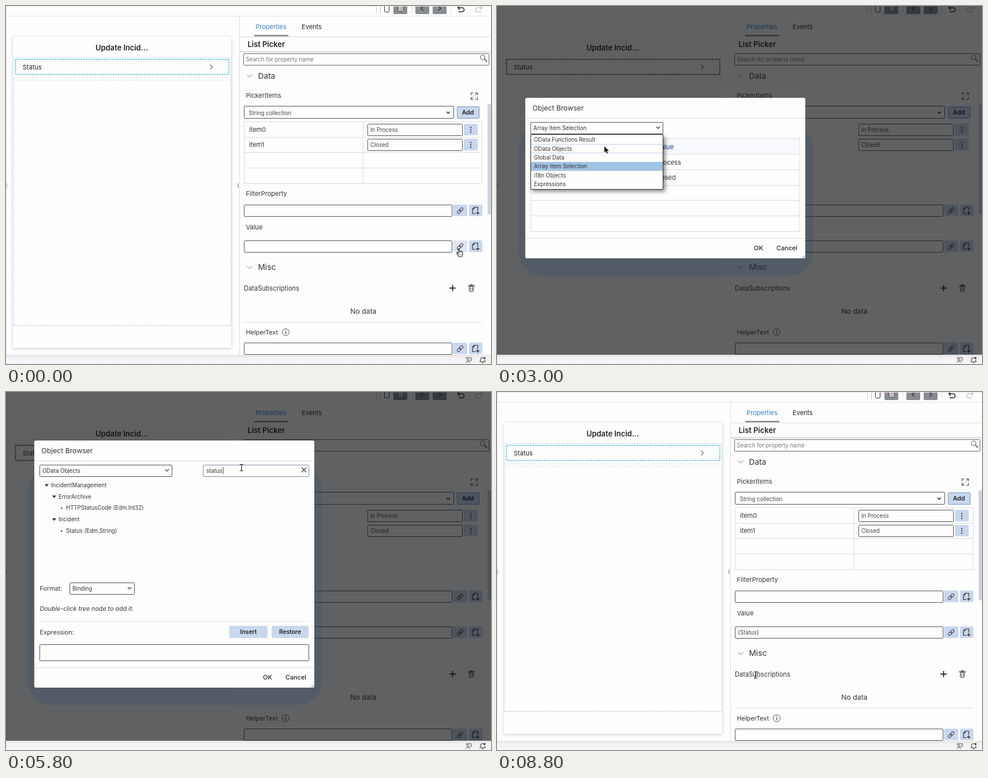
These frames come from a looping animation (840 px wide and 620 px high, 9.2 s). An HTML page with a canvas:

```html
<!DOCTYPE html>
<html lang="en">
<head>
<meta charset="utf-8">
<title>Binding a list picker value</title>
<style>
html, body { margin: 0; width: 100%; height: 100%; overflow: hidden; background: #fefefe; }
canvas { display: block; width: 840px; height: 620px; }
</style>
</head>
<body>
<canvas id="stage" width="840" height="620"></canvas>
<script>
const stage = document.getElementById('stage');
const layer = Object.assign(document.createElement('canvas'), { width: 840, height: 620 });
const page = stage.getContext('2d'), sheet = layer.getContext('2d');
let ctx = page; // where the helpers draw

const LOOP = 9200, TICK = 200;
const SMALL = 9.65, BASE = 11;
const INK = '#232325', BORDER = '#555557', PALE = '#dcdde0', BUTTON = '#c9d7ee';

// Stepped values: the last entry whose time has passed
const VEIL = [[0, 0], [200, 0.5], [400, 1], [8600, 0.4], [8800, 0]];
const DIALOG = [[0, 0], [200, 0.5], [400, 1], [8400, 0.25], [8600, 0]];
const QUERY = [[0, ''], [4800, 's'], [5000, 'sta'], [5200, 'statu'], [5400, 'status']];
const POINTER = [[0, 'hand'], [600, 'arrow'], [1200, 'hand'], [1800, 'arrow'], [4200, 'beam'],
  [4800, 'none'], [5800, 'beam'], [6000, 'arrow'], [8000, 'hand'], [8600, 'beam']];
// Pointer path: time, x, y
const PATH = [[0, 786, 427], [400, 786, 427], [1200, 285, 224], [1800, 285, 224], [2200, 268, 235],
  [2600, 268, 235], [3000, 186, 243], [3600, 186, 243], [4400, 408, 131], [5800, 408, 131],
  [6400, 150, 235], [7200, 150, 235], [8000, 450, 497], [8400, 450, 497], [8600, 448, 490]];

const SOURCES = ['OData Functions Result', 'OData Objects', 'Global Data',
  'Array Item Selection', 'i18n Objects', 'Expressions'];
const TREE = [[0, 'open', 'IncidentManagement'], [1, 'shut', 'ErrorArchive'], [1, 'shut', 'EventLog'],
  [1, 'open', 'Incident'], [2, 'open', 'customer (IncidentManagementMobileService.Customer)'],
  [3, 'leaf', 'AddressCity (Edm.String)'], [3, 'leaf', 'AddressCountry (Edm.String)'],
  [3, 'leaf', 'AddressHouseNumber (Edm.String)'], [3, 'leaf', 'AddressPostCode (Edm.String)']];
const MATCHES = [[0, 'open', 'IncidentManagement'], [1, 'open', 'ErrorArchive'],
  [2, 'leaf', 'HTTPStatusCode (Edm.Int32)'], [1, 'open', 'Incident'], [2, 'leaf', 'Status (Edm.String)']];

const HAND = new Path2D('M3.2 6V1.6c0-1.6 2-1.6 2 0V5c.3-1 1.9-.8 1.9.3.5-.9 1.9-.6 1.9.5.6-.6 1.8-.3 1.8.9V9.5L9.6 14H4.2L.8 8.8C0 7.4 1.4 6.6 2.3 7.6L3.2 8.6Z');
const ARROW = new Path2D('M0 0V11L2.5 8.6 4.2 12.6 6 11.8 4.3 8H7.8Z');

function stepAt(list, t) {
  let value = list[0][1];
  for (const [time, v] of list) if (t >= time) value = v;
  return value;
}

function pointerAt(t) {
  for (let i = 1; i < PATH.length; i++) {
    const [t0, x0, y0] = PATH[i - 1], [t1, x1, y1] = PATH[i];
    if (t < t1) {
      const u = (t - t0) / (t1 - t0), e = u * u * (3 - 2 * u);
      return [x0 + (x1 - x0) * e, y0 + (y1 - y0) * e];
    }
  }
  return PATH[PATH.length - 1].slice(1);
}

function fill(x, y, w, h, color, r = 0) {
  ctx.fillStyle = color;
  ctx.beginPath();
  ctx.roundRect(x, y, w, h, r);
  ctx.fill();
}

// Framed box given by its outer edges
function box(x0, y0, x1, y1, stroke = BORDER, back = null, r = 1) {
  if (back) fill(x0, y0, x1 - x0, y1 - y0, back, r);
  ctx.strokeStyle = stroke;
  ctx.lineWidth = 1;
  ctx.beginPath();
  ctx.roundRect(x0 + 0.5, y0 + 0.5, x1 - x0 - 1, y1 - y0 - 1, r);
  ctx.stroke();
}

function poly(points, color = INK, width = 1, closed = false) {
  ctx.beginPath();
  points.forEach(([x, y], i) => i ? ctx.lineTo(x, y) : ctx.moveTo(x, y));
  if (closed) {
    ctx.closePath();
    ctx.fillStyle = color;
    ctx.fill();
  } else {
    ctx.strokeStyle = color;
    ctx.lineWidth = width;
    ctx.stroke();
  }
}

const rule = (x0, x1, y, color = PALE) => fill(x0, y, x1 - x0, 1, color);
const post = (x, y0, y1, color = PALE) => fill(x, y0, 1, y1 - y0, color);

// y is the middle of the capitals
function text(s, x, y, size = BASE, color = INK, style = '400', align = 'left') {
  ctx.font = `${style} ${size}px Inter, Roboto, sans-serif`;
  ctx.textAlign = align;
  ctx.fillStyle = color;
  ctx.fillText(s, x, y + size * 0.36);
}

function chevron(x, y, color = INK, w = 3, width = 1.4) {
  poly([[x - w, y - w / 2], [x, y + w / 2], [x + w, y - w / 2]], color, width);
}

function dashed(x0, y0, x1, y1, color, width, pattern) {
  ctx.setLineDash(pattern);
  poly([[x0, y0], [x1, y0], [x1, y1], [x0, y1], [x0, y0]], color, width);
  ctx.setLineDash([]);
}

function ring(x, y, r, color, width, from = 0, to = Math.PI * 2) {
  ctx.strokeStyle = color;
  ctx.lineWidth = width;
  ctx.beginPath();
  ctx.arc(x, y, r, from, to);
  ctx.stroke();
}

function lens(x, y) {
  ring(x - 1.5, y - 1.5, 4, '#6a6a6c', 1.2);
  poly([[x + 1.5, y + 1.5], [x + 6, y + 6]], '#6a6a6c', 1.8);
}

function linkIcon(x, y) {
  ctx.save();
  ctx.translate(x, y);
  ctx.rotate(-Math.PI / 4);
  ctx.strokeStyle = '#444';
  ctx.lineWidth = 1;
  for (const dx of [-6.2, -0.8]) {
    ctx.beginPath();
    ctx.roundRect(dx, -2.2, 7, 4.4, 2.2);
    ctx.stroke();
  }
  ctx.restore();
}

function bindIcon(x, y) {
  poly([[x + 4, y], [x + 4, y - 6], [x - 2, y - 6], [x - 5, y - 3], [x - 5, y + 5], [x, y + 5]], '#333', 1.2);
  poly([[x - 2, y - 6], [x - 2, y - 3], [x - 5, y - 3]], '#333', 1);
  poly([[x + 1, y + 4], [x + 7, y + 4]], '#222', 1.2);
  poly([[x + 4, y + 1], [x + 4, y + 7]], '#222', 1.2);
}

function boundField(y, value, hover) {
  box(412, y, 773, y + 21, BORDER, '#fefefe');
  if (value) text(value, 417, y + 11, SMALL, '#444');
  fill(774, y, 25, 20, hover ? '#dfe6f2' : BUTTON, 2);
  fill(802, y, 23, 20, BUTTON, 2);
  linkIcon(786.5, y + 10.5);
  bindIcon(813, y + 10.5);
}

function toolbar() {
  post(641, 0, 13, '#ccc');
  post(648, 0, 13, '#bbb');
  box(655, -5, 664, 11, '#222', '#fff', 2);
  fill(671, -8, 24, 22, '#898c91', 2);
  box(678, -5, 689, 10, '#444', '#b9bbbe', 2);
  fill(709, -8, 24, 22, '#898c91', 2);
  fill(739, -8, 24, 22, '#898c91', 2);
  poly([[723, 0], [719, 4], [723, 8]], '#333', 1.4);
  poly([[749, 0], [753, 4], [749, 8]], '#333', 1.4);
  post(703, 0, 13);
  post(770, 0, 13);
  for (const [x, dir, color] of [[788, 1, '#222'], [819, -1, '#c4c4c6']]) {
    ctx.save();
    ctx.translate(x, 0);
    ctx.scale(dir, 1);
    poly([[-5, 3], [2, 3]], color, 1.5);
    poly([[-2, -0.5], [-5.5, 3], [-2, 6.5]], color, 1.5);
    ring(2, 6.5, 3.5, color, 1.5, -Math.PI / 2, Math.PI / 2);
    poly([[2, 10], [-4, 10]], color, 1.5);
    ctx.restore();
  }
}

function phone(veil) {
  ctx.save();
  ctx.globalAlpha = 1 - 0.92 * veil;
  ctx.save();
  ctx.shadowColor = 'rgba(0,0,0,.22)';
  ctx.shadowBlur = 5;
  ctx.shadowOffsetY = 1;
  fill(12, 53, 378, 539, '#fefefe', 1);
  ctx.restore();
  dashed(13.5, 89.5, 389.5, 553, '#a9d4e4', 1, [2, 2]);
  dashed(13.5, 124.5, 389.5, 128.5, '#c6e0ea', 1, [2, 2]);
  rule(12, 390, 553);
  rule(0, 840, 17, '#e3e3e5');
  ctx.restore();
  text('Update Incid...', 200.5, 72, 12.9, INK, '600', 'center');
  dashed(16.5, 92.5, 386, 118.5, veil > 0.5 ? '#333' : '#4fb8df', 1.4, [3, 1.5]);
  text('Status', 29, 106, BASE);
  poly([[353.5, 101.5], [357.5, 105.5], [353.5, 109.5]], '#666', 1.1);
}

function properties(t, veil) {
  const done = t >= 8400;
  text('Properties', 459, 36, BASE, '#3a82c8', '400', 'center');
  text('Events', 529.5, 36, BASE, INK, '400', 'center');
  fill(430, 50, 59, 2.5, '#85878c');
  text('List Picker', 418.5, 66.5, 12.9, INK, '600');
  ctx.save();
  ctx.globalAlpha = 1 - 0.92 * veil;
  post(404, 17, 604);
  rule(405, 840, 53);
  rule(405, 840, 79, '#b9babd');
  for (const y of [200, 227, 253, 280, 307]) rule(412, 825, y);
  for (const x of [412, 618, 824]) post(x, 200, 308);
  rule(412, 825, 547);
  ctx.restore();

  box(411, 82, 837, 103, '#666', '#fefefe');
  text('Search for property name', 415.5, 92.5, SMALL, '#777');
  lens(827, 90.5);

  for (const [label, y] of [['Data', 121], ['Misc', 452.5]]) {
    chevron(422, y, '#777', 4.5, 1);
    text(label, 436.5, y, 13.7, '#333');
  }
  text('PickerItems', 415.5, 155.5, BASE, '#333');
  for (const [dx, dy] of [[-1, -1], [1, -1], [-1, 1], [1, 1]]) {
    const x = 811 + dx * 5.5, y = 156 + dy * 5.5;
    poly([[x - dx * 4, y], [x, y], [x, y - dy * 4]], '#444', 1.1);
    if (dx !== dy) poly([[x, y], [x - dx * 4, y - dy * 4]], '#444', 1);
  }

  box(412, 173, 776, 195, BORDER, '#fefefe');
  text('String collection', 420.5, 185.5, SMALL, '#444');
  chevron(766, 184.5);
  box(781, 174, 820, 195, '#7394c4', BUTTON);
  text('Add', 800, 184.5, 10.8, INK, '600', 'center');

  [['item0', 'In Process', 204], ['item1', 'Closed', 230]].forEach(([key, value, y]) => {
    text(key, 421, y + 10.5, BASE, '#333');
    box(626, y, 791, y + 21, BORDER, '#fefefe');
    text(value, 631, y + 10.5, SMALL, '#444');
    fill(793, y, 24, 20, BUTTON, 2);
    for (const dy of [-4, 0, 4]) fill(804, y + 9.5 + dy, 2, 2, '#333');
  });

  text('FilterProperty', 415.5, 325.5, BASE, '#333');
  boundField(344, '', false);
  text('Value', 415.5, 383.5, BASE, '#333');
  boundField(406, done ? '{Status}' : '', t < 400);

  text('DataSubscriptions', 412, 489.5, 11.1, '#333');
  fill(768, 487.6, 11, 1.8, '#222');
  fill(772.6, 483, 1.8, 11, '#222');
  box(802, 485, 810, 495, '#333', null, 1);
  fill(800, 484, 12, 1.3, '#333');
  fill(803.5, 482, 5, 1.3, '#333');
  post(804, 487, 493, '#444');
  post(807, 487, 493, '#444');
  text('No data', 619, 528.5, 12.3, '#333', '400', 'center');

  text('HelperText', 415.5, 565, 10.9, '#333');
  ring(484.5, 565, 6, '#555', 1);
  fill(483.9, 563.8, 1.3, 4.6, '#444');
  fill(483.9, 561.2, 1.3, 1.4, '#444');
  boundField(583, '', false);
  fill(834, 170, 6, 191, '#cfd4de', 2);
  fill(0, 307, 2, 8, '#b3b3b5');
  fill(401, 307, 2, 8, '#b3b3b5');
}

function statusBar() {
  const shade = ctx.createLinearGradient(0, 604, 0, 620);
  shade.addColorStop(0, '#e6e4e6');
  shade.addColorStop(0.35, '#f3f1f3');
  shade.addColorStop(1, '#f7f5f7');
  fill(0, 604, 840, 16, shade);
  poly([[797, 611], [797, 609], [806, 609], [806, 614], [803, 614]], '#555', 1);
  ring(800, 612.5, 1.8, '#555', 1);
  poly([[796, 618], [798, 615.5], [802, 615.5], [804, 618]], '#555', 1);
  poly([[820.5, 616], [822, 614], [822, 610.5], [824, 609], [827, 609]], '#444', 1.1);
  poly([[820.5, 616], [830, 616], [828.5, 613]], '#444', 1.1);
  fill(827, 608, 3.5, 3.5, '#333', 2);
  fill(824, 617, 3, 1.3, '#444');
}

function dialogFrame(top, bottom) {
  fill(49, top, 485, bottom - top, '#fefefe', 3);
  text('Object Browser', 61.5, top + 18, 12.2, '#333');
  rule(49, 534, top + 35);
  rule(49, 534, bottom - 35);
  poly([[529, bottom - 1], [533, bottom - 5]], '#555', 1);
}

function actions(y, hover) {
  if (hover) box(437, y - 9, 470, y + 10, '#6f7f99', '#9cabc4', 2);
  text('OK', 453, y, BASE, INK, '500', 'center');
  text('Cancel', 502, y, 10.9, INK, '500', 'center');
}

function select(x0, y0, x1, label, hover) {
  box(x0, y0, x1, y0 + 21, BORDER, '#fefefe');
  if (hover) fill(x1 - 17, y0 + 1, 16, 19, '#cfdcf0');
  text(label, x0 + 5, y0 + 10.5, SMALL, '#333');
  chevron(x1 - 9, y0 + 9.5, hover ? '#f4f7fb' : '#444');
}

function arrayDialog(t) {
  dialogFrame(159, 437);
  select(58, 201, 288, SOURCES[3], t >= 1200 && t < 1800);
  fill(58, 230, 467, 27, '#f8f9fd');
  for (const y of [229, 256, 283, 310, 336, 363, 390]) rule(58, 525, y);
  post(58, 230, 391);
  post(524, 230, 391);
  text('Value', 291.5, 244, BASE, '#1c3f8c', '400', 'center');
  text('In Process', 291.5, 271, BASE, '#333', '400', 'center');
  text('Closed', 291.5, 297.5, BASE, '#333', '400', 'center');
  actions(419.5, false);
  if (t >= 1800) optionList(t);
}

function optionList(t) {
  ctx.save();
  ctx.shadowColor = 'rgba(0,0,0,.5)';
  ctx.shadowBlur = 7;
  ctx.shadowOffsetX = ctx.shadowOffsetY = 3;
  fill(58, 223, 230, 95, '#fefefe');
  ctx.restore();
  fill(59, 270, 228, 15.5, '#a2c3e2');
  if (t >= 2800) {
    rule(59, 287, 239, '#bcd3e8');
    rule(59, 287, 254, '#bcd3e8');
  }
  box(58, 222, 288, 318, '#333', null, 0);
  SOURCES.forEach((s, i) => text(s, 64, 231.8 + i * 15.4, SMALL, '#333'));
}

function treeRow([depth, kind, label], i) {
  const x = 70.5 + depth * 13, y = 161.5 + i * 19.75;
  if (kind === 'open') poly([[x - 3.5, y - 2], [x + 3.5, y - 2], [x, y + 2.5]], '#333', 1, true);
  if (kind === 'shut') poly([[x - 2, y - 3.5], [x + 2.5, y], [x - 2, y + 3.5]], '#333', 1, true);
  if (kind === 'leaf') fill(x - 1.5, y - 1, 2.5, 2.5, '#444', 1);
  text(label, x + 7.5, y, SMALL, '#333');
}

function dataDialog(t) {
  const query = stepAt(QUERY, t), filtered = t >= 5800, filled = t >= 7000;
  const focus = t >= 4400 && t < 7000;
  dialogFrame(84, 512);
  select(58, 126, 288, SOURCES[1]);

  box(341, 126, 525, 147, focus ? '#7f8fa6' : '#666', '#fefefe');
  text(query || 'Search for data field', 347, 136.5, SMALL, query ? '#333' : '#888');
  if (query) {
    poly([[512, 131], [520, 139]], '#444', 1.4);
    poly([[520, 131], [512, 139]], '#444', 1.4);
  } else {
    lens(516, 134);
  }
  if (focus) post(347 + (query ? ctx.measureText(query).width + 1 : 0), 130, 142, '#444');

  ctx.save();
  ctx.beginPath();
  ctx.rect(50, 150, 483, 167.5);
  ctx.clip();
  if (t >= 6400 && t < 7600) fill(93, 232.5, 430, 17, '#ebebec');
  (filtered ? MATCHES : TREE).forEach(treeRow);
  ctx.restore();
  if (!filtered) fill(515, 154, 10, 51, '#d0d0d2', 2);

  text('Format:', 58.5, 340.5, 10.8, '#333');
  select(110, 330, 223, 'Binding');
  text('Double-click tree node to add it.', 58.5, 375, 10.7, '#333', 'italic 400');
  rule(58, 525, 397, '#e8e8ea');
  text('Expression:', 58.5, 416, 10.8, '#333');
  fill(387, 405, 66, 21, BUTTON, 2);
  fill(460, 405, 64, 21, BUTTON, 2);
  text('Insert', 420, 415.5, 10.3, INK, '600', 'center');
  text('Restore', 492, 415.5, 10.3, INK, '600', 'center');
  box(58, 437, 525, 466, filled && t < 8200 ? '#3f78b5' : BORDER, '#fefefe');
  if (filled) {
    text('{Status}', 63, 446.5, SMALL, '#333');
    if (t < 8200) post(100, 441, 452, '#333');
  }
  actions(494, t >= 8000);
}

// The dialog is drawn on its own layer so that it fades as a whole
function dialog(t, alpha) {
  const early = t < 3400;
  if (alpha === 1) {
    const [top, bottom] = early ? [159, 437] : [84, 512];
    fill(38, top + 45, 509, bottom - top - 15, 'rgba(50,78,110,.25)', 42);
  }
  ctx = sheet;
  ctx.clearRect(0, 0, 840, 620);
  (early ? arrayDialog : dataDialog)(t);
  ctx = page;
  ctx.globalAlpha = alpha;
  ctx.drawImage(layer, 0, 0);
  ctx.globalAlpha = 1;
}

function pointer(t) {
  const kind = stepAt(POINTER, t), [x, y] = pointerAt(t);
  ctx.save();
  ctx.translate(x, y);
  if (kind === 'hand') {
    ctx.translate(-6, -7);
    ctx.fillStyle = '#fff';
    ctx.fill(HAND);
    ctx.strokeStyle = '#222';
    ctx.lineWidth = 1.1;
    ctx.stroke(HAND);
    poly([[5.2, 9], [5.2, 11.5]], '#444', 0.8);
    poly([[7.2, 9], [7.2, 11.5]], '#444', 0.8);
  } else if (kind === 'arrow') {
    ctx.strokeStyle = '#fff';
    ctx.lineWidth = 1.6;
    ctx.stroke(ARROW);
    ctx.fillStyle = '#111';
    ctx.fill(ARROW);
  } else if (kind === 'beam') {
    poly([[0, -5], [0, 5]], '#222', 1.2);
    for (const s of [-1, 1]) poly([[-3, s * 6], [0, s * 5], [3, s * 6]], '#222', 1.1);
  }
  ctx.restore();
}

function draw(t) {
  const veil = stepAt(VEIL, t), alpha = stepAt(DIALOG, t);
  fill(0, 0, 840, 620, '#fefefe');
  toolbar();
  phone(veil);
  properties(t, veil);
  rule(0, 840, 0, '#f8e2e1');
  post(0, 0, 604, '#f8e2e1');
  fill(0, 0, 840, 604, `rgba(12,14,16,${0.65 * veil})`);
  statusBar();
  if (alpha) dialog(t, alpha);
  pointer(t);
}

const start = performance.now();
function frame() {
  const t = (performance.now() - start) % LOOP;
  draw(Math.floor(t / TICK) * TICK);
  requestAnimationFrame(frame);
}
frame();
</script>
</body>
</html>
```
